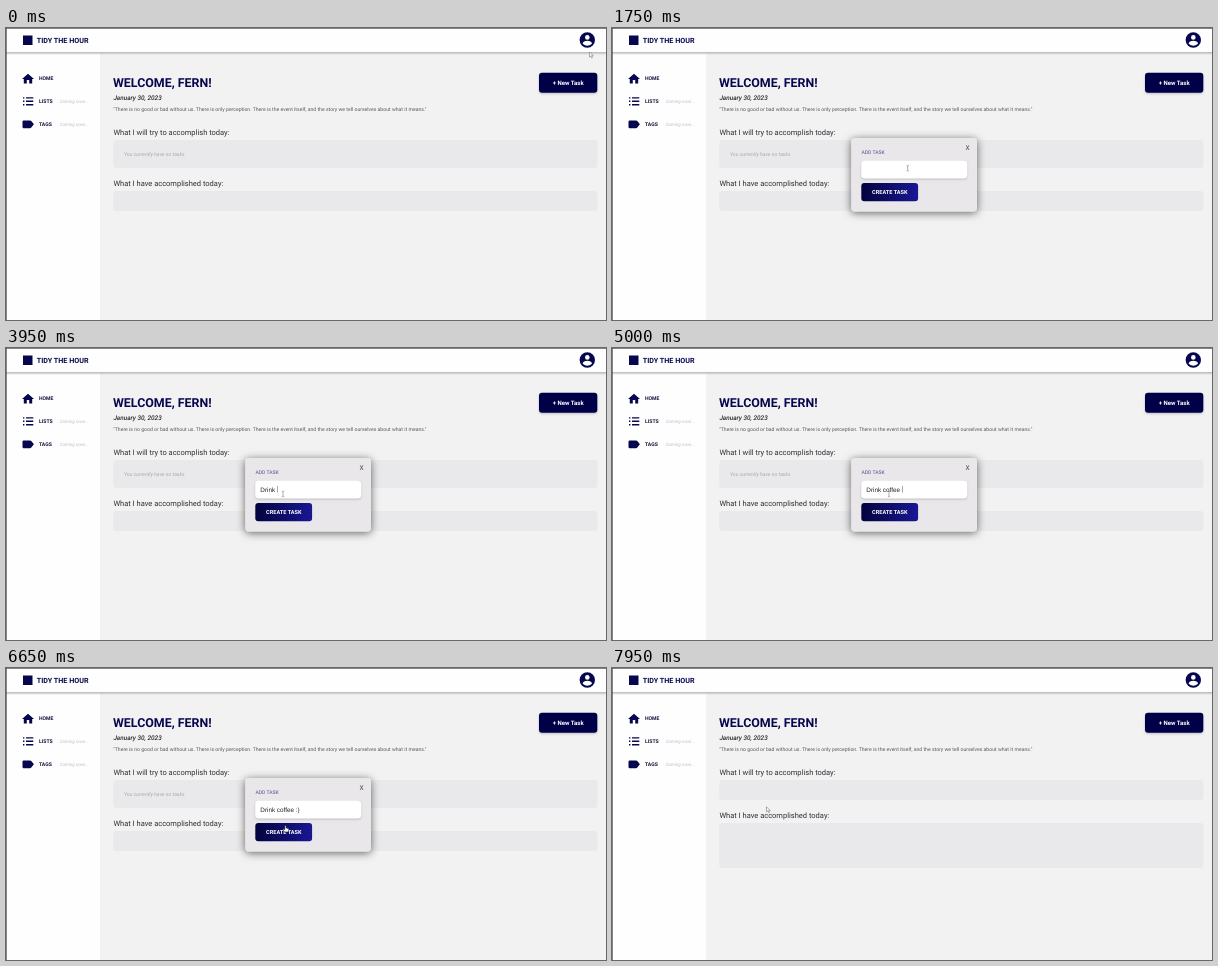
An HTML page for the animation above (8000 ms loop, 600 by 292 pixels).

```html
<!DOCTYPE html>
<html lang="en">
<head>
<meta charset="utf-8">
<title>Daily tasks</title>
<style>
  html, body { margin: 0; width: 100%; height: 100%; overflow: hidden; background: #f2f2f3; }
  svg { display: block; width: 100%; height: 100%; }
  text { font-family: Roboto, sans-serif; text-rendering: geometricPrecision; white-space: pre; }
  .navy { fill: #06064f; }
  .bold { font-weight: 700; }
  .nav { font-size: 5.1px; font-weight: 700; fill: #12123c; }
  .soon { font-size: 4.5px; font-style: italic; fill: #bcbcc2; }
  .head { font-size: 7.52px; fill: #303034; }
  .box { fill: #e9e9eb; }
  .cursor { fill: #fff; stroke: #333; stroke-width: .6; stroke-linejoin: round; }
</style>
</head>
<body>
<svg viewBox="0 0 600 292" preserveAspectRatio="none">
  <defs>
    <linearGradient id="btn"><stop stop-color="#03033f"/><stop offset="1" stop-color="#1a1793"/></linearGradient>
    <linearGradient id="edge" x2="0" y2="1"><stop stop-color="#b4b4ba"/><stop offset="1" stop-color="#b4b4ba" stop-opacity="0"/></linearGradient>
    <filter id="deep" x="-30%" y="-40%" width="160%" height="190%"><feDropShadow dx="0" dy="1.5" stdDeviation="4" flood-opacity=".6"/></filter>
    <filter id="soft" x="-20%" y="-40%" width="140%" height="190%"><feDropShadow dx="0" dy="1" stdDeviation="1.3" flood-opacity=".22"/></filter>
  </defs>

  <rect width="600" height="292" fill="#f2f2f3"/>
  <rect width="94" height="292" fill="#fefefe"/>
  <rect width="600" height="24" fill="#fefefe"/>
  <rect y="24" width="600" height="3" fill="url(#edge)"/>
  <path d="M0 .4H600M.4 0V292" stroke="#55555a" stroke-width=".8"/>

  <rect class="navy" x="17" y="7.5" width="9.5" height="9.5"/>
  <text class="navy" x="30.7" y="14.6" font-size="7.2" font-weight="700">TIDY THE HOUR</text>
  <circle class="navy" cx="581.3" cy="12" r="7.7"/>
  <circle cx="581.3" cy="9.4" r="2.3" fill="#fff"/>
  <path d="M576.6 15.8c0-4.2 9.4-4.2 9.4 0q-4.7 4-9.4 0z" fill="#fff"/>

  <path class="navy" d="M22 45.7l6 5.2h-1.8v4.5h-3v-3.4h-2.4v3.4h-3v-4.5H16z"/>
  <path d="M17 69.9h1.4M17 73.3h1.4M17 76.7h1.4M20 69.9h7.3M20 73.3h7.3M20 76.7h7.3" stroke="#06064f" stroke-width="1.4"/>
  <path class="navy" d="M17.7 92.4h6.3q.8 0 1.3.7l2.6 3.2-2.6 3.2q-.5.7-1.3.7h-6.3q-1.2 0-1.2-1.2v-5.4q0-1.2 1.2-1.2z"/>
  <text class="nav" x="33" y="52.4">HOME</text>
  <text class="nav" x="33" y="75.1">LISTS</text>
  <text class="nav" x="33" y="98">TAGS</text>
  <text class="soon" x="53.7" y="74.7">Coming soon...</text>
  <text class="soon" x="53.7" y="97.6">Coming soon...</text>

  <text class="navy bold" x="107" y="59.3" font-size="12.4">WELCOME, FERN!</text>
  <text x="107.4" y="72.1" font-size="6.45" font-weight="500" font-style="italic" fill="#29292d">January 30, 2023</text>
  <text x="107.2" y="82.6" font-size="5.12" fill="#59595e">"There is no good or bad without us. There is only perception. There is the event itself, and the story we tell ourselves about what it means."</text>
  <g filter="url(#soft)"><rect x="533" y="44.7" width="58.3" height="20" rx="3" fill="#03034a"/></g>
  <text class="bold" x="562.2" y="56.8" font-size="6.05" text-anchor="middle" fill="#fff">+ New Task</text>

  <text class="head" x="107.4" y="107.4">What I will try to accomplish today:</text>
  <rect id="todo" class="box" x="107.3" y="112" width="484.2" rx="3.5"/>
  <text id="empty" x="118" y="128" font-size="5.12" font-style="italic" fill="#a9a9ae">You currently have no tasks</text>
  <g id="done">
    <text class="head" x="107.4" y="-5.1">What I have accomplished today:</text>
    <rect id="doneBox" class="box" x="107.3" width="484.2" rx="3.5"/>
  </g>
  <text id="row" x="118" y="136.6" font-size="6" fill="#303034">Drink coffee :)</text>

  <g id="modal">
    <rect x="239.2" y="110" width="125.8" height="73.6" rx="4" fill="#e9e7ea" filter="url(#deep)"/>
    <text x="249.4" y="125.5" font-size="5.02" fill="#4c4c8c">ADD TASK</text>
    <text x="355.5" y="122.2" font-size="6.6" text-anchor="middle" fill="#44444c">X</text>
    <rect x="249.3" y="132.8" width="105.8" height="17.4" rx="3.5" fill="#fff" filter="url(#soft)"/>
    <text id="typed" x="254.3" y="143.5" font-size="6.35" fill="#222" style="font-family:'Liberation Sans',Arial,sans-serif"></text>
    <rect id="caret" y="137.8" width=".5" height="6.8" fill="#555"/>
    <rect x="249.3" y="155" width="56.8" height="18.3" rx="3" fill="url(#btn)"/>
    <text class="bold" x="277.8" y="166.2" font-size="5.6" text-anchor="middle" fill="#fff">CREATE TASK</text>
  </g>

  <path id="arrow" class="cursor" style="stroke:#77777c" d="M0 0v5l1.2-1 .9 1.9.9-.4-.9-1.8h1.6z"/>
  <path id="hand" class="cursor" d="M-.6-2.6q.6-.7 1.2 0v2l2.1.6q.7.2.6 1l-.5 2.4h-3.5l-1.7-2.2q0-.8.8-.6l1 .6z"/>
  <path id="beam" d="M-1.2-2.6h.8l.4.3.4-.3h.8M0-2.3v4.6M-1.2 2.6h.8l.4-.3.4.3h.8" fill="none" stroke="#77777c" stroke-width=".6"/>
</svg>
<script>
const LOOP = 8000, OPEN = 950, FOCUS = 1950, CREATE = 7000, CHECK = 7900;
const TASK = 'Drink coffee :)';
const KEYS = [3250, 3370, 3490, 3620, 3740, 3860, 4100, 4230, 4360, 4480, 4620, 4750, 4880, 5350, 5700];
// Pointer stops: time, x, y
const STOPS = [[0, 583.5, 24], [150, 583.5, 24], [750, 576.5, 54], [1200, 576.5, 54], [1850, 277, 146],
  [6050, 277, 146], [6450, 279.5, 160.5], [7050, 279.5, 160.5], [7600, 154.5, 138.8], [8000, 154.5, 138.8]];

const $ = id => document.getElementById(id);
const set = (id, name, value) => $(id).setAttribute(name, value);
const show = (id, on) => set(id, 'visibility', on ? 'visible' : 'hidden');
const ease = p => p * p * (3 - 2 * p);

function pointer(t) {
  const i = STOPS.findIndex(s => s[0] > t);
  const [t0, x0, y0] = STOPS[i - 1], [t1, x1, y1] = STOPS[i];
  const p = ease((t - t0) / (t1 - t0));
  return [x0 + (x1 - x0) * p, y0 + (y1 - y0) * p];
}

function pointerKind(x, y, open, listed) {
  const inside = (l, t, r, b) => x > l && x < r && y > t && y < b;
  if (inside(533, 44.7, 591, 65)) return 'hand';
  if (open && inside(249, 155, 306, 173)) return 'hand';
  if (open && inside(249, 133, 355, 150)) return 'beam';
  return listed && inside(117, 130, 162, 140) ? 'hand' : 'arrow';
}

function render(t) {
  const open = t >= OPEN && t < CREATE;
  const listed = t >= CREATE && t < CHECK;
  const checked = t >= CHECK;

  const todoHeight = listed ? 45 : checked ? 20 : 28;
  set('todo', 'height', todoHeight);
  set('done', 'transform', `translate(0 ${135 + todoHeight})`);
  set('doneBox', 'height', checked ? 45 : 20);
  show('empty', t < CREATE);
  show('row', listed);
  set('row', 'opacity', Math.max(0, Math.min(1, (t - CREATE - 50) / 300)));

  show('modal', open);
  const count = KEYS.filter(k => k <= t).length;
  $('typed').textContent = TASK.slice(0, count);
  const since = t - (count ? KEYS[count - 1] : FOCUS);
  show('caret', open && since >= 0 && since % 1000 < 500);
  set('caret', 'x', 254.5 + (count ? $('typed').getComputedTextLength() : 0));

  const [x, y] = pointer(t);
  const kind = pointerKind(x, y, open, listed);
  for (const id of ['arrow', 'hand', 'beam']) {
    show(id, id === kind);
    set(id, 'transform', `translate(${x} ${y})`);
  }
}

const start = performance.now();
function tick(now) {
  render(Math.max(0, now - start) % LOOP);
  requestAnimationFrame(tick);
}
render(0);
requestAnimationFrame(tick);
</script>
</body>
</html>
```
